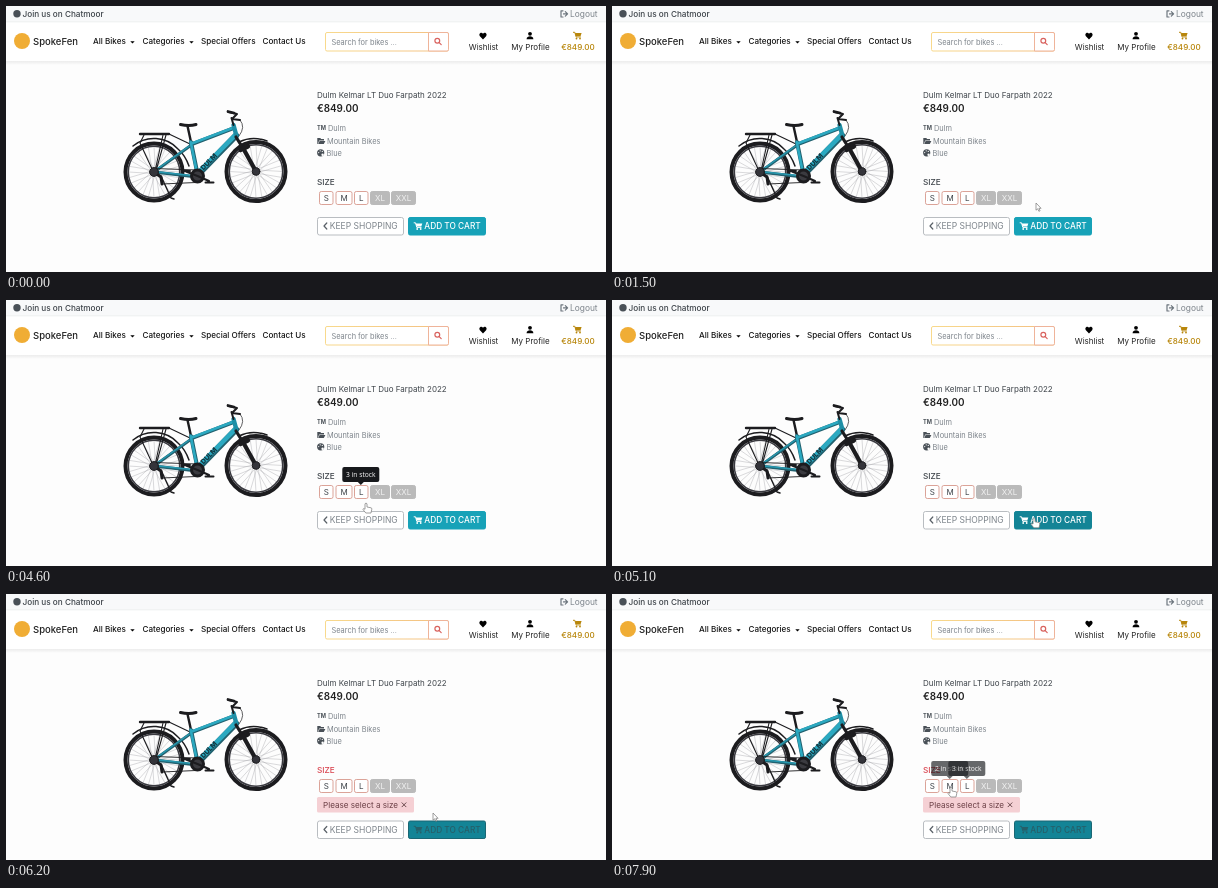
An HTML page for the animation above (8 s loop, 600 by 266 pixels).

```html
<!DOCTYPE html>
<html lang="en">
<head>
<meta charset="utf-8">
<title>Bike shop</title>
<style>
html, body { margin: 0; width: 100%; height: 100%; overflow: hidden; background: #fdfdfd; }
svg { display: block; width: 100vw; height: 100vh; }
text { font: 400 8px Inter, sans-serif; fill: #3d4349; }
.mid { text-anchor: middle; }
.med { font-weight: 500; }
.nav text { font-weight: 500; font-size: 8.1px; fill: #151515; }
.muted text, text.muted { fill: #7d848b; }
.muted text { font-size: 7.4px; }
.tip text { font: 400 6.7px "Open Sans", sans-serif; fill: #fff; text-anchor: middle; }
.line { fill: none; stroke-linecap: round; stroke-linejoin: round; }
</style>
</head>
<body>
<svg viewBox="0 0 600 266" preserveAspectRatio="none">
  <defs>
    <g id="cart">
      <path class="line" d="M.4 .8H1.8L3.1 5.4H7.4" stroke="currentColor"/>
      <path d="M2 1.4H8.6L7.6 4.6H2.9Z" fill="currentColor"/>
      <circle cx="3.5" cy="7" r=".9" fill="currentColor"/>
      <circle cx="7" cy="7" r=".9" fill="currentColor"/>
    </g>
    <linearGradient id="shade" x2="0" y2="1">
      <stop stop-color="#000" stop-opacity=".07"/>
      <stop offset="1" stop-color="#000" stop-opacity="0"/>
    </linearGradient>
    <linearGradient id="rim">
      <stop stop-color="#f8d98c"/>
      <stop offset="1" stop-color="#f3bf82"/>
    </linearGradient>
  </defs>
  <rect width="600" height="266" fill="#fdfdfd"/>

  <!-- top bar -->
  <rect width="600" height="16" fill="#f8f9fa"/>
  <rect y="15.5" width="600" height="1" fill="#eceded"/>
  <circle cx="11" cy="7.8" r="3.7" fill="#495057"/>
  <text class="med" x="16.5" y="10.8" style="font-size:8.2px">Join us on Chatmoor</text>
  <g class="line" stroke="#6c757d" stroke-width="1.2">
    <path d="M557 4.8H555V11H557M557.5 7.9H561M559.3 5.6L561.6 7.9L559.3 10.2"/>
  </g>
  <text class="muted" x="564" y="10.8" style="font-size:8.4px">Logout</text>

  <!-- navigation -->
  <rect y="16.5" width="600" height="39" fill="#fff"/>
  <rect y="55" width="600" height="4" fill="url(#shade)"/>
  <circle cx="16" cy="35" r="8" fill="#f0ad35"/>
  <text class="med" x="27" y="38.5" style="font-size:9.5px;fill:#222">SpokeFen</text>
  <g class="nav">
    <text x="87" y="38">All Bikes</text>
    <path d="M124.3 35.2H128.7L126.5 37.4Z"/>
    <text x="136.5" y="38">Categories</text>
    <path d="M183.3 35.2H187.7L185.5 37.4Z"/>
    <text x="195" y="38">Special Offers</text>
    <text x="256.5" y="38">Contact Us</text>
    <path d="M477 33.4L473.9 30.2C472.2 27.7 475.3 25.3 477 27.7C478.7 25.3 481.8 27.7 480.1 30.2Z"/>
    <circle cx="524" cy="27.8" r="1.9"/>
    <path d="M520.6 33.2C520.6 29.4 527.4 29.4 527.4 33.2Z"/>
    <g style="color:#b8860b"><use href="#cart" x="567" y="25.5"/></g>
  </g>
  <text class="mid" x="477.5" y="44" style="fill:#222">Wishlist</text>
  <text class="mid" x="524.5" y="44" style="fill:#222">My Profile</text>
  <text class="mid med" x="572" y="44" style="font-size:8.1px;fill:#b8860b">€849.00</text>
  <rect x="319.5" y="26.5" width="123" height="18.5" rx="1.5" fill="#fff" stroke="url(#rim)"/>
  <path d="M422.5 26.5H441Q442.5 26.5 442.5 28V43.5Q442.5 45 441 45H422.5Z" fill="#fff" stroke="#efb49a"/>
  <text class="muted" x="325.5" y="38.5" style="font-size:7.4px">Search for bikes ...</text>
  <g class="line" stroke="#d9625e" stroke-width="1.2">
    <circle cx="431.3" cy="34.7" r="2.4"/><path d="M433.2 36.6L435.2 38.6"/>
  </g>

  <!-- bicycle -->
  <g class="line" stroke="#1c1c1f">
    <g id="wheels"></g>
    <path d="M127 140A33 33 0 0 1 172 143Q179 149 183 160M233 136Q246 129.500 261 135" stroke-width="1.5"/>
    <path d="M134 128H163" stroke-width="2.4"/>
    <path d="M163 128L184 138M138 129L134 137L147 165M157 129L149 165M160 129L150 165" stroke-width="1.1"/>
    <path d="M148 166L191 171M148 166L184 140" stroke="#22616f" stroke-width="2.8"/>
    <path d="M148 165.500L190 170M148.500 165L184 139.500" stroke="#2799b0" stroke-width="1.5"/>
    <path d="M181.500 120L185 136" stroke-width="2.4"/>
    <path d="M185 136L191.500 168M185 138.500L228 122" stroke="#22616f" stroke-width="4"/>
    <path d="M184.700 136L191 167M185 137.700L228 121.500" stroke="#2ba9c1" stroke-width="2.6"/>
    <path d="M230 129.500L192 168.500" stroke="#22616f" stroke-width="6.2"/>
    <path d="M229.500 128.800L191.500 167.500" stroke="#2ba9c1" stroke-width="4.6"/>
    <path d="M227.500 119L230.500 130" stroke="#1f8fa6" stroke-width="4.4"/>
    <path d="M174.500 118.500Q183 120.500 190 118.500" stroke-width="3"/>
    <path d="M225.500 112L227.500 119M222 106L231 108L226 113L234 114" stroke-width="2"/>
    <path d="M222 105.500L228 107" stroke-width="2.8"/>
    <path d="M234 114Q240 121 233 130" stroke-width=".7"/>
    <path d="M230 131L237.500 143" stroke-width="3.2"/>
    <path d="M237 142L250 165.500M234.500 144L242 140.500" stroke-width="4.2"/>
    <circle cx="191.500" cy="170" r="6" stroke-width="3" fill="#3b3b40"/>
    <path d="M191.500 170L203 175M199.500 176.500H207.500M191.500 170L180 165.500M176 165H184" stroke-width="2"/>
    <path d="M148 162.500L191 164M156 178L190 176.500" stroke-width=".9"/>
    <path d="M148 166L155 171L156 178" stroke-width="3"/>
    <path d="M155 170L165 192L168 193" stroke-width="1.4"/>
    <circle cx="148" cy="166" r="4.400" fill="#34343a" stroke-width="1"/>
    <circle cx="250" cy="165.500" r="3.800" fill="#34343a" stroke-width="1"/>
  </g>
  <text class="mid" transform="translate(204.5 157.3) rotate(-46)" style="font-size:6.8px;font-weight:800;fill:#12343d">DULM</text>

  <!-- product -->
  <text x="311" y="91.8" style="font-size:8px">Dulm Kelmar LT Duo Farpath 2022</text>
  <text x="311" y="105.6" style="font-size:9.9px;font-weight:600;fill:#222">€849.00</text>
  <g class="muted">
    <text x="311" y="123.6" style="font-size:5.6px;font-weight:700;fill:#495057">TM</text>
    <text x="322" y="125.2">Dulm</text>
    <path d="M311.3 138V132H314.2L315.2 133H318V134.4H313.2L311.8 138ZM312.2 138L313.6 135H319.4L317.8 138Z" fill="#495057"/>
    <text x="321" y="138">Mountain Bikes</text>
    <circle cx="314.7" cy="146.8" r="3.6" fill="#495057"/>
    <g fill="#fff">
      <circle cx="312.7" cy="146.6" r=".6"/><circle cx="314.2" cy="144.8" r=".6"/>
      <circle cx="316.3" cy="145.4" r=".6"/><circle cx="316.6" cy="148.8" r="1.2"/>
    </g>
    <text x="320.5" y="149.8">Blue</text>
  </g>
  <text id="size" class="med" x="311" y="179.4" style="font-size:8.2px">SIZE</text>
  <g id="sizes"></g>

  <g id="alert">
    <rect x="311" y="203" width="97" height="15.5" rx="1.5" fill="#f5d0d4"/>
    <text x="317" y="213.7" style="font-size:8.1px;fill:#6b3f45">Please select a size</text>
    <path class="line" d="M396 208.8L400 212.8M400 208.8L396 212.8" stroke="#6b4a4e"/>
  </g>
  <g id="actions">
    <rect x="311.5" y="211.5" width="86" height="17.5" rx="2" fill="#fff" stroke="#b9bdc1"/>
    <path class="line" d="M320.8 217L318 220L320.8 223" stroke="#5a6168" stroke-width="1.2"/>
    <text class="muted" x="323.8" y="223" style="font-size:8.5px">KEEP SHOPPING</text>
    <rect id="add" x="402.5" y="211.5" width="77" height="17.5" rx="1.6"/>
    <g id="label">
      <use href="#cart" x="407.7" y="216"/>
      <text x="418.3" y="223" style="font-size:8.3px;font-weight:500;fill:currentColor">ADD TO CART</text>
    </g>
  </g>
  <g id="tips"></g>
  <g id="cursor" fill="#fff" stroke="#777" stroke-width=".7" stroke-linejoin="round">
    <path id="arrow" d="M0 0V7.2L1.700 5.800L2.900 8.300L4.100 7.700L2.900 5.300H5.100Z"/>
    <path id="hand" d="M-1 .8Q0 -.8 1 .8V4L5 4.8Q6 5 5.8 6.2L5 10H-.2L-3 6.5Q-3.2 5 -1 6.2Z"/>
  </g>
</svg>
<script>
const LOOP = 8000, STEP = 100, CLICK = 5800;
const $ = id => document.getElementById(id);
const clamp = v => Math.max(0, Math.min(1, v));

const wheel = (cx, cy, r) => {
  let spokes = '';
  for (let i = 0; i < 28; i++) {
    const a = i * Math.PI / 14, b = a + (i % 2 ? .5 : -.5);
    spokes += `M${cx + 3 * Math.cos(b)} ${cy + 3 * Math.sin(b)}L${cx + (r - 5) * Math.cos(a)} ${cy + (r - 5) * Math.sin(a)}`;
  }
  return `<path d="${spokes}" stroke="#a2a2a8" stroke-width=".4"/>
    <circle cx="${cx}" cy="${cy}" r="${r - 2}" stroke-width="4"/>
    <circle cx="${cx}" cy="${cy}" r="${r - 4.8}" stroke="#3a3a40" stroke-width="1.5"/>`;
};
$('wheels').innerHTML = wheel(148, 166, 30.5) + wheel(250, 165.5, 31.5);

// label, left, width, in stock
$('sizes').innerHTML = [
  ['S', 313, 14.5, 1], ['M', 329.5, 17, 1], ['L', 348, 14.5, 1], ['XL', 364, 20, 0], ['XXL', 385, 25, 0]
].map(([s, x, w, ok]) => `
  <rect x="${x + .5}" y="185.5" width="${w - 1}" height="13" rx="1.8"
    fill="${ok ? '#fff' : '#bababa'}" stroke="${ok ? '#dba398' : '#bababa'}"/>
  <text class="mid" x="${x + w / 2}" y="194.8" style="font-size:8px;fill:${ok ? '#3d4349' : '#f1f1f1'}">${s}</text>`).join('');

// centre, text, start, end
const tips = [
  [397.5, 'Out of stock', 1650, 2400],
  [374, 'Out of stock', 2350, 3380],
  [354.8, '3 in stock', 3350, 4900],
  [337.7, '2 in stock', 7770, 9000],
  [354.8, '3 in stock', 7350, 8030]
];
$('tips').innerHTML = tips.map(([x, s]) => {
  const w = s.length > 10 ? 46 : 37;
  return `<g class="tip"><rect x="${x - w / 2}" y="167" width="${w}" height="15" rx="2" fill="#17191c"/>
    <path d="M${x - 3} 182H${x + 3}L${x} 185Z" fill="#17191c"/>
    <text x="${x}" y="177">${s}</text></g>`;
}).join('');
const tipNodes = [...$('tips').children];

// time, x, y
const path = [
  [500, 455, 270], [1300, 430, 204], [1500, 424, 197], [1800, 398, 200], [2200, 398, 200],
  [2600, 375, 201], [3000, 375, 201], [3200, 358, 201], [3600, 360, 203], [4600, 360, 203],
  [5200, 427, 219], [6600, 427, 219], [6900, 424, 222], [7100, 380, 221], [7500, 357, 194],
  [7700, 357, 194], [7900, 339, 193], [8000, 339, 193]
];
const handTimes = [[3400, 4700], [5100, 5900], [7400, 8000]];

function locate(t) {
  const i = Math.max(1, path.findIndex(p => p[0] >= t));
  const [t0, x0, y0] = path[i - 1], [t1, x1, y1] = path[i];
  const u = clamp((t - t0) / (t1 - t0)), k = u * u * (3 - 2 * u);
  return [x0 + (x1 - x0) * k, y0 + (y1 - y0) * k];
}

function draw(t) {
  const failed = t >= CLICK, hover = t >= 5100;
  const hand = handTimes.some(([a, b]) => t >= a && t < b);
  $('cursor').setAttribute('transform', `translate(${locate(t)})`);
  $('cursor').style.display = t < 500 ? 'none' : '';
  $('arrow').style.display = hand ? 'none' : '';
  $('hand').style.display = hand ? '' : 'none';

  const face = hover ? '#138496' : '#17a2b8';
  $('size').style.fill = failed ? '#d9434e' : '#3d4349';
  $('alert').style.opacity = clamp((t - CLICK + 100) / 300);
  $('actions').setAttribute('transform', `translate(0 ${failed ? 15.5 : 0})`);
  $('add').style.fill = face;
  $('add').style.stroke = failed ? '#1a6774' : face;
  $('label').style.color = failed ? '#265f69' : '#fff';

  tips.forEach(([, , a, b], i) => {
    tipNodes[i].style.opacity = clamp(Math.min((t - a) / 200, (b - t) / 200));
  });
}

const start = performance.now();
function tick() {
  const t = (performance.now() - start) % LOOP;
  draw(Math.floor(t / STEP) * STEP);
  requestAnimationFrame(tick);
}
tick();
</script>
</body>
</html>
```
